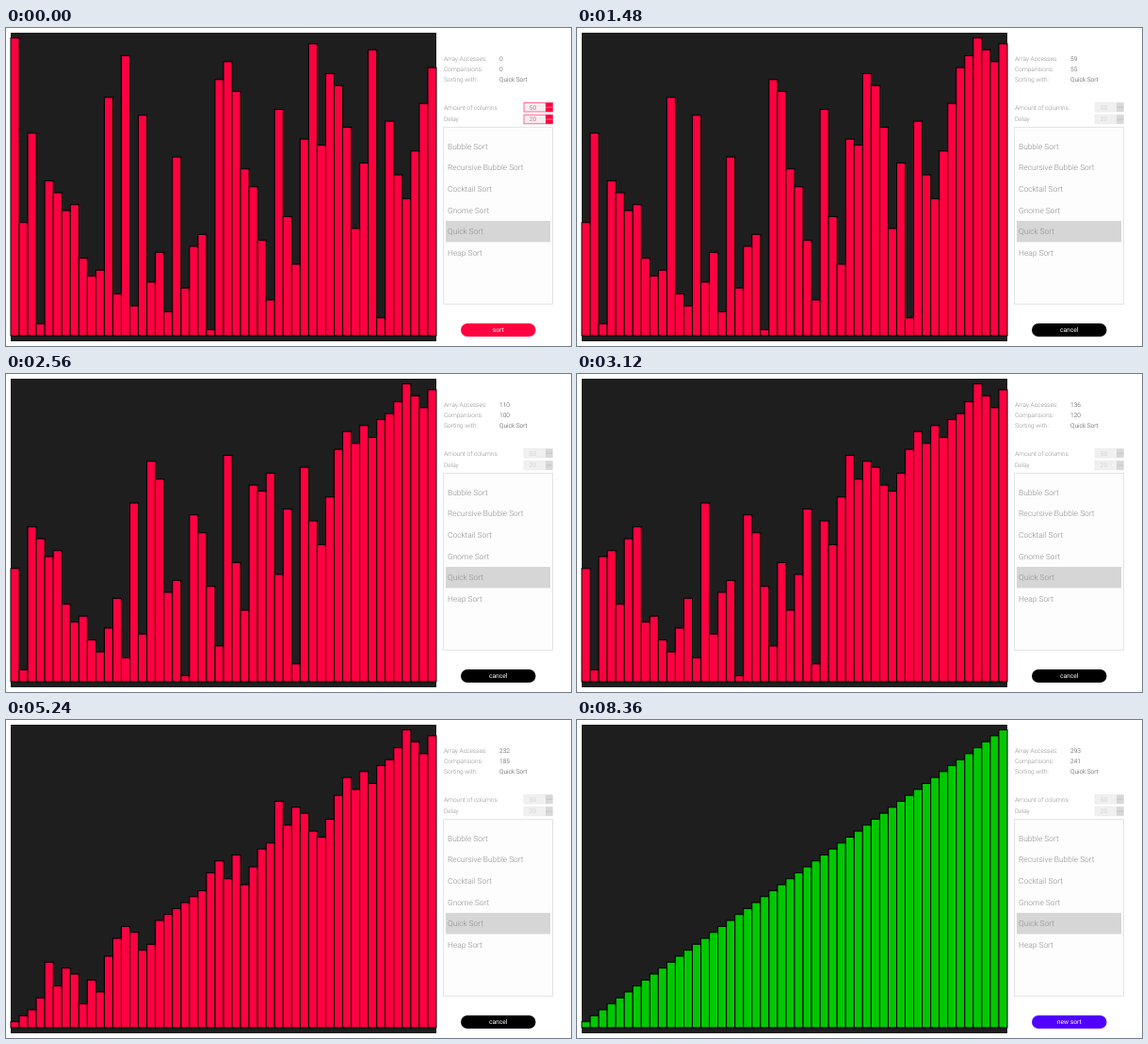
Recreate the animation shown at these times as an HTML page. Size 600 px wide and 338 px high, loop 8400 ms.

```html
<!DOCTYPE html>
<html lang="en">
<head>
<meta charset="utf-8">
<title>Quick Sort</title>
<style>
html, body { margin: 0; width: 100%; height: 100%; overflow: hidden; background: #fff; }
svg { display: block; }
text { font: 300 6.55px Roboto, sans-serif; fill: #8c8c8c; text-rendering: geometricPrecision; }
.value text { fill: #444; }
.list text { font-size: 8.4px; }
#label { font-size: 6.7px; font-weight: 400; fill: #fff; text-anchor: middle; }
.spin text { text-anchor: middle; fill: #d8285a; }
.spin .field { fill: #f4eef0; stroke: #ff4a78; stroke-width: .8; }
.spin .arrows { fill: #ff0040; }
.spin .split { stroke: #ffb0c4; stroke-width: .7; }
.off text { fill: #c6c6c6; }
.off .field { fill: #f0f0f0; stroke: #ececec; }
.off .arrows { fill: #d8d8d8; }
.off .split { stroke: #c0c0c0; }
</style>
</head>
<body>
<svg id="stage" width="600" height="338" viewBox="0 0 600 338">
  <rect x="5" y="5" width="452" height="328" fill="#1e1e1e"/>
  <g id="bars" stroke="#000" stroke-width="1"></g>
  <text x="465" y="35">Array Accesses:</text>
  <text x="465" y="46">Comparisions:</text>
  <text x="465" y="57">Sorting with:</text>
  <g class="value">
    <text id="accesses" x="524" y="35">0</text>
    <text id="comparisons" x="524" y="46">0</text>
    <text x="524" y="57">Quick Sort</text>
  </g>
  <text x="465" y="86.6">Amount of columns</text>
  <text x="465" y="99.4">Delay</text>
  <g id="spinners" class="spin"></g>
  <rect x="464.5" y="105.5" width="116" height="188" fill="#fdfdfd" stroke="#e4e4e4"/>
  <rect x="467" y="205" width="111" height="22.5" fill="#d6d6d6"/>
  <g id="list" class="list"></g>
  <rect id="button" x="483" y="314" width="79.5" height="14" rx="7"/>
  <text id="label" x="522.7" y="323.2"></text>
</svg>
<script>
const LOOP = 8400, COUNT = 50, BAR = 9.04, UNIT = 6.33, BASE = 327;
const RED = '#ff0040', GREEN = '#00c800';
const START = [50, 19, 34, 2, 26, 24, 21, 22, 13, 10, 11, 40, 7, 47, 5, 37, 9,
  14, 4, 30, 8, 15, 17, 1, 43, 46, 41, 28, 25, 16, 6, 38, 20, 12, 33, 49, 32,
  44, 42, 35, 18, 29, 48, 3, 36, 27, 23, 31, 39, 45];

const $ = id => document.getElementById(id);

function add(parent, tag, attrs, text = '') {
  const el = document.createElementNS('http://www.w3.org/2000/svg', tag);
  for (const key in attrs) el.setAttribute(key, attrs[key]);
  el.textContent = text;
  return parent.appendChild(el);
}

// Record every tick of a quick sort that uses the last item as pivot.
function record(start) {
  const a = [...start], steps = [];
  let accesses = 0, swaps = 0;
  const save = () => steps.push({ values: [...a], accesses, swaps });
  const swap = (i, j) => { [a[i], a[j]] = [a[j], a[i]]; swaps++; };
  const sort = (low, high) => {
    if (low >= high) return;
    let i = low;
    for (let j = low; j < high; j++) {
      accesses++;
      if (a[j] < a[high]) swap(i++, j);
      save();
    }
    swap(i, high);
    save();
    sort(low, i - 1);
    sort(i + 1, high);
  };
  save();
  sort(0, a.length - 1);
  return steps;
}

const steps = record(START);
const bars = START.map((_, i) =>
  add($('bars'), 'rect', { x: 5 + i * BAR, width: BAR }));

['Bubble Sort', 'Recursive Bubble Sort', 'Cocktail Sort', 'Gnome Sort', 'Quick Sort', 'Heap Sort']
  .forEach((name, i) => add($('list'), 'text', { x: 469, y: 128.8 + i * 22.6 }, name));

[[79.5, 50], [92.3, 20]].forEach(([y, value]) => {
  const g = $('spinners');
  add(g, 'rect', { class: 'field', x: 550, y, width: 30.5, height: 9.5 });
  add(g, 'rect', { class: 'arrows', x: 573, y, width: 7.5, height: 9.5 });
  add(g, 'path', { class: 'split', d: `M573 ${y + 4.75}h7.5` });
  add(g, 'text', { x: 559.5, y: y + 7.1 }, value);
});

// The first ticks run a little slower than the rest.
const tickAt = t => t < 1480 ? (t - 80) / 23.14 : 60.5 + (t - 1480) / 20.77;

function draw(t) {
  const n = Math.max(0, Math.min(steps.length - 1, Math.floor(tickAt(t))));
  const { values, accesses, swaps } = steps[n];
  const green = Math.floor((t - 7021) / 5.9);
  bars.forEach((bar, i) => {
    const h = values[i] * UNIT;
    bar.setAttribute('y', BASE - h);
    bar.setAttribute('height', h);
    bar.setAttribute('fill', i < green ? GREEN : RED);
  });
  $('accesses').textContent = accesses;
  $('comparisons').textContent = swaps;

  const [label, color] = t < 40 ? ['sort', RED]
    : green < COUNT ? ['cancel', '#000'] : ['new sort', '#5000ff'];
  $('label').textContent = label;
  $('button').setAttribute('fill', color);
  $('spinners').setAttribute('class', t < 40 ? 'spin' : 'spin off');
}

const began = performance.now();
function frame() {
  draw((performance.now() - began) % LOOP);
  requestAnimationFrame(frame);
}
frame();
</script>
</body>
</html>
```
